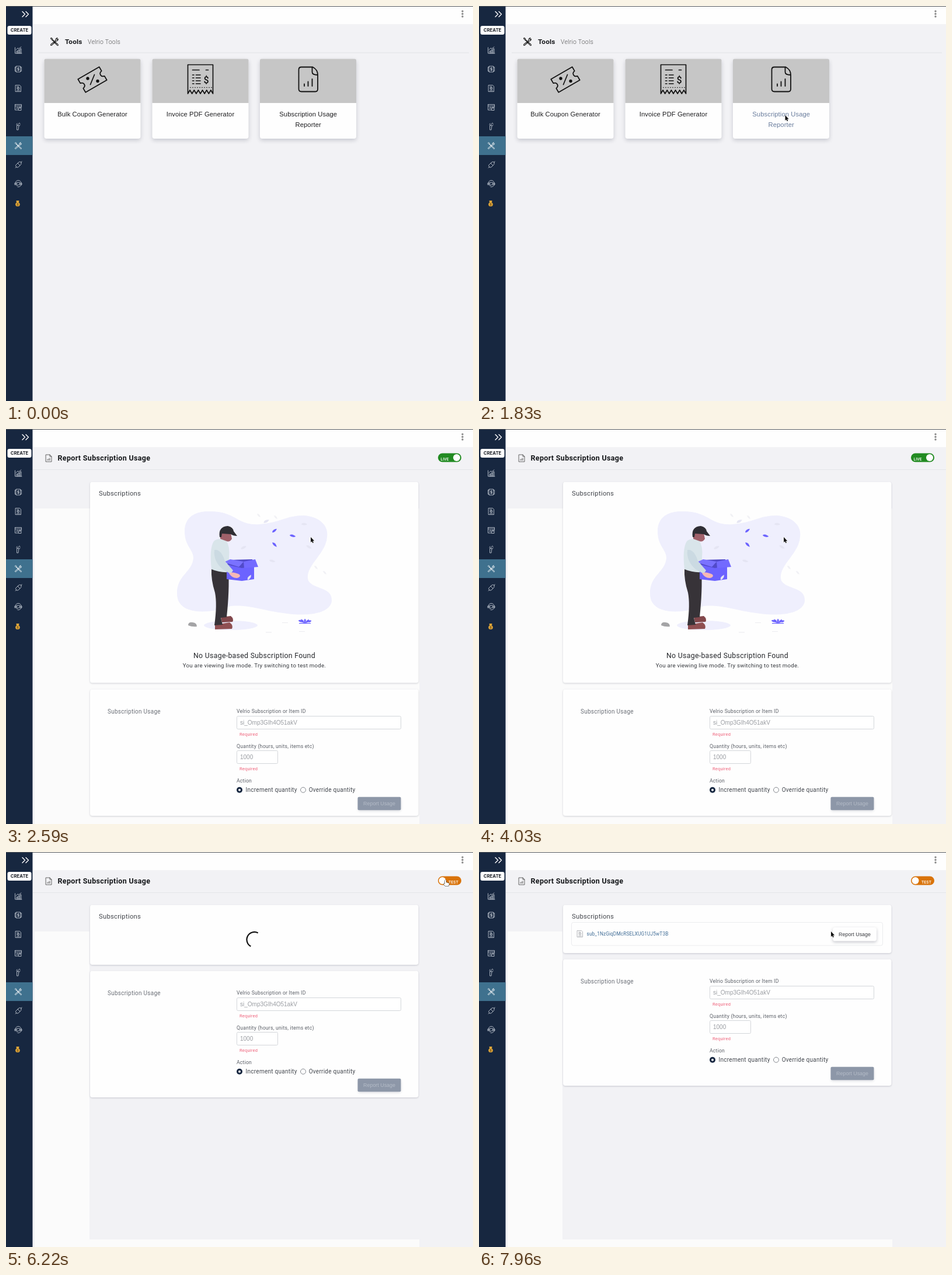
An HTML page with a canvas that plays this animation: 800x676 px, repeating every 8000 ms.

```html
<!DOCTYPE html>
<html lang="en">
<head>
<meta charset="utf-8">
<title>Subscription usage reporter</title>
<style>
html, body { margin: 0; width: 100%; height: 100%; overflow: hidden; background: #f2f2f5; }
canvas { display: block; }
</style>
</head>
<body>
<canvas id="stage" width="800" height="676"></canvas>
<script>
const ctx = document.getElementById('stage').getContext('2d');
const LOOP = 8000;
const OPEN = 1900, EMPTY = 2540, CLICK = 5470, RELOAD = 5540, LOADED = 7330;
const BODY = 'Roboto, sans-serif', UI = '"Liberation Sans", Arial, sans-serif';
const NAVY = '#172740', PAGE = '#f2f2f5', VIOLET = '#6c63ff';

const clamp = v => Math.max(0, Math.min(1, v));
const mix = (a, b, p) => a + (b - a) * p;
const blend = (a, b, p) => `rgb(${a.map((v, i) => Math.round(mix(v, b[i], p)))})`;

function rect(x, y, w, h, color) {
  ctx.fillStyle = color;
  ctx.fillRect(x, y, w, h);
}

function box(x, y, w, h, r, fill, stroke) {
  ctx.beginPath();
  ctx.roundRect(x, y, w, h, r);
  if (fill) { ctx.fillStyle = fill; ctx.fill(); }
  if (stroke) { ctx.strokeStyle = stroke; ctx.lineWidth = 1; ctx.stroke(); }
}

function card(x, y, w, h, blur = 3, dy = 1, alpha = 0.2) {
  ctx.save();
  ctx.shadowColor = `rgba(30,35,60,${alpha})`;
  ctx.shadowBlur = blur;
  ctx.shadowOffsetY = dy;
  box(x, y, w, h, 4, '#fefefe');
  ctx.restore();
}

function text(s, x, y, size, color, { font = BODY, weight = 400, space = 0.25, align = 'left' } = {}) {
  ctx.font = `${weight} ${size}px ${font}`;
  ctx.letterSpacing = space + 'px';
  ctx.textAlign = align;
  ctx.fillStyle = color;
  ctx.fillText(s, x, y);
}

function shape(d, color) {
  ctx.fillStyle = color;
  ctx.fill(new Path2D(d));
}

function icon(d, x, y, color, width = 1, scale = 1) {
  ctx.save();
  ctx.translate(x, y);
  ctx.scale(scale, scale);
  ctx.strokeStyle = color;
  ctx.lineWidth = width;
  ctx.lineJoin = ctx.lineCap = 'round';
  ctx.stroke(new Path2D(d));
  ctx.restore();
}

function disc(x, y, rx, color, ry = rx, turn = 0) {
  ctx.beginPath();
  ctx.ellipse(x, y, rx, ry, turn, 0, 7);
  ctx.fillStyle = color;
  ctx.fill();
}

const TOOLS = 'M-6.5-5.5L-5.5-6.5L-3.5-5L-3-3L5.8 4.5Q7 6 6 6.5Q5 7 4 5.5L-3.5-2.5L-5-3.5Z' +
  'M-6 4.5L2-2Q1.5-5.5 5-6.5L4-4L5-3L6.5-4.5Q6-1 3-1L-4.5 6Q-6 7-6.5 6Z';
const SHEET = 'M-4.5-6H2L5-3V6H-4.5ZM2-6V-3H5M-2 3.5V2M0 3.5V1M2 3.5V0';
const MENU = [
  [76, 'M-5.5-5V5H6M-3 5V1H-1V5M0 5V-1H2V5M3 5V-3H5V5M-4-1L-1-4L1-3L5-6'],
  [108, 'M-3.5-5H3.5V5H-3.5ZM-3.5-3.5H-5.5V3.5H-3.5M3.5-3.5H5.5V3.5H3.5M1-2H-1V0H1V2H-1M0-3V3'],
  [141, 'M-4.5-5.5H2.5L4.5-3.5V5.5H-4.5ZM-2.5-3H1M-2 0A2 2 0 1 0 2 0A2 2 0 1 0-2 0M0-1V1M-2.5 3.7H2.5'],
  [173.5, 'M-5.5-5H5.5V0M-5.5-5V4.5H0M-5.5-2.5H5.5M-3 0H0M-3 2H-1M1 1H5V5H1ZM2 1V-.5H4V1'],
  [206, 'M-2-2L1-1L0 6H-2ZM-1-2L1-5M2-6L3-4M1-1L3-2M-3-3L-2-5'],
  [239, TOOLS],
  [272, 'M-5 5L-3 3M-3 4Q-6 1-3-1L-1-3L3 1L1 3Q-1 5-3 4M0-4Q4-7 5-4Q6-1 3 1M-1-3L0-4M5-4L6-6'],
  [304, 'M-5 1A5.2 5.2 0 1 1 5 1M-5-1H-6V2H-4V-1M5-1H6V2H4V-1M-2.5-2H2.5V2H0L-2 3.5ZM5 2Q4 5 1 5.5H-1']
];

function frame() {
  rect(0, 0, 800, 676, PAGE);
  rect(46, 0, 754, 31, '#fefefe');
}

function chrome() {
  rect(0, 0, 45.5, 676, NAVY);
  rect(0, 223, 45.5, 32, '#3f718e');
  rect(0, 0, 800, 1, '#55585c');
  icon('M-5-4.5L-.5 0L-5 4.5M1-4.5L5.5 0L1 4.5', 33, 14, '#fff', 1.4);
  box(2.5, 34, 41, 15, 3, '#fff');
  text('CREATE', 23, 44.3, 7.8, '#20242b', { font: 'Inter, sans-serif', weight: 700, space: 0, align: 'center' });
  for (const [y, d] of MENU) icon(d, 21, y, y === 239 ? '#fff' : '#cfd5de', y === 239 ? 1 : 0.8, y === 239 ? 0.85 : 1);
  disc(20, 339.5, 3.8, '#dfa63a', 3.6);
  shape('M18 336.5L17.5 333H22.5L22 336.5Z', '#dfa63a');
  text('$', 20, 342, 6, '#6b4a12', { weight: 700, space: 0, align: 'center' });
  for (const y of [9, 13.5, 18]) disc(782, y, 1.7, '#8a8a8a');
}

function ticketIcon() {
  ctx.save();
  ctx.translate(148, 126);
  ctx.rotate(-Math.PI / 6);
  icon('M-21-13H21V-5Q16-4 16 0Q16 4 21 5V13H-21V5Q-16 4-16 0Q-16-4-21-5Z', 0, 0, '#111', 1.8);
  ctx.restore();
  icon('M-3.5 8.5L3.5-8.5', 148, 126, '#111', 1.7);
  disc(140, 124, 2.7, '#111');
  disc(157, 128.5, 2.7, '#111');
}

function receiptIcon() {
  let d = 'M311.5 150V100.5H354.5V150';
  for (let i = 1; i <= 12; i++) d += `L${354.5 - i * 43 / 12} ${i % 2 ? 144 : 150}`;
  icon(d, 0, 0, '#111', 1.7);
  icon('M319.5 109.5H331M342.5 109.5H346.5', 0, 0, '#111', 1.7);
  for (let y = 118; y < 136; y += 5) icon(`M319.5 ${y}H322M325.5 ${y}H333`, 0, 0, '#111', 1.6);
  for (let x = 316; x < 353; x += 4) disc(x, 139.5, 0.8, '#111');
  text('$', 343, 131.5, 16, '#111', { weight: 500, space: 0, align: 'center' });
}

function listPage(t) {
  icon(TOOLS, 83, 61, '#222', 1.1);
  text('Tools', 101, 64.5, 11.8, '#15171a', { weight: 700, space: 0.2 });
  text('Velrio Tools', 140, 64.5, 10.5, '#555', { weight: 300, space: 0.2 });
  rect(56, 79.5, 737, 1, '#e2e3e6');
  for (const x of [65.5, 250.5, 435]) {
    card(x, 90.5, 165, 136.5, 7, 3, 0.2);
    box(x, 90.5, 165, 75.5, [3, 3, 0, 0], '#c6c6c6');
  }
  ticketIcon();
  receiptIcon();
  icon('M506 104.5H525.5Q534 109 534 118V142Q534 146.5 530 146.5H506Q501.5 146.5 501.5 142V109Q501.5 104.5 506 104.5ZM524.5 104.5V113Q524.5 118 534 118M511 133.5V137M517.5 129.5V137M524.5 125V137', 0, 0, '#111', 1.8);
  const style = { font: UI, space: 0.1, align: 'center' };
  const hover = blend([30, 30, 32], [106, 125, 157], clamp((t - 1260) / 150));
  text('Bulk Coupon Generator', 148, 189, 11.2, '#1e1e20', style);
  text('Invoice PDF Generator', 333, 189, 11.2, '#1e1e20', style);
  text('Subscription Usage', 517.7, 189, 11.2, hover, style);
  text('Reporter', 517.7, 206.5, 11.2, hover, style);
}

function toggle(t) {
  const p = clamp((t - CLICK) / 200);
  box(740, 41.5, 40, 15, 7.5, blend([34, 139, 34], [217, 115, 10], p));
  if (p < 0.5) text('LIVE', 744.5, 54, 6.6, '#fff', { weight: 500, space: 0.2 });
  else text('TEST', 758, 54, 6.8, '#fff', { weight: 500, space: 0.2 });
  disc(mix(772, 747.5, p), 49, 6, '#fff');
}

function spinner(t) {
  const start = t < EMPTY ? -25 + (t - 2240) * 0.36 : 118 + (t - 6220) * 0.36;
  ctx.beginPath();
  ctx.arc(425.5, 150, 13, start * Math.PI / 180, (start + 180) * Math.PI / 180);
  ctx.strokeStyle = '#111';
  ctx.lineWidth = 2.2;
  ctx.lineCap = 'butt';
  ctx.stroke();
}

function leaf(x, y, turn, color, size = 1) {
  ctx.save();
  ctx.translate(x, y);
  ctx.rotate(turn);
  ctx.scale(size, size);
  shape('M-6 0Q-2-5 6 0Q0 4-6 0Z', color);
  ctx.restore();
}

function worker() {
  shape('M306 175C306 150 325 140 350 141C395 141 395 166 435 163C470 160 480 148 510 148C540 150 553 168 550 185C548 215 510 235 518 260C528 275 560 270 558 295C555 312 530 320 490 317C440 312 420 300 385 303C345 318 293 318 293 282C292 250 320 245 321 220C320 205 306 200 306 175Z', '#efeffd');
  disc(385, 336, 46, '#efeffd', 8);
  shape('M368 322L385 320Q391 325 388 330L370 331Z', '#82474b');
  shape('M358 335L383 331Q390 336 387 342L358 343Z', '#8f4f52');
  shape('M352 239L381 242Q383 275 378 322L368 323L371 335L357 336Q362 300 358 280Q351 258 352 239Z', '#373338');
  shape('M352 240Q348 205 356 192Q364 185 377 191Q384 200 382 220L381 245Q366 246 352 240Z', '#d9e5ea');
  shape('M367 178H385L387 188Q383 194 378 192L367 188Z', '#a0616a');
  shape('M366 185Q363 167 380 166Q389 168 390 175L396 183Q389 183 385 180L370 179L369 185Z', '#2f2e34');
  shape('M384 224L422 223L425 236L404 240L378 232Z', '#514ac9');
  shape('M378 232L404 238L425 235V257L404 260L378 257Z', VIOLET);
  shape('M373 228L384 223L407 227L399 236Z', '#7a72ff');
  shape('M407 227L427 223L432 236L408 238Z', '#736aff');
  shape('M357 207Q355 226 371 240L385 248L389 242L375 226Q368 205 357 207Z', '#cbdae2');
  shape('M382 247Q388 243 400 249Q403 253 396 255Q388 256 382 247Z', '#f6b8b5');
  shape('M312 336Q312 330 320 331Q327 332 327 338Q319 339 312 336Z', '#a4a4a6');
  for (const [x, turn] of [[505, 0.25], [508, 0.8], [512, 1.57], [516, 2.3], [519, 2.9]]) leaf(x, 329, turn, VIOLET, 0.75);
  rect(502, 332, 20, 1.2, VIOLET);
  leaf(460, 174, -0.7, VIOLET, 0.85);
  leaf(491, 183, 0.2, VIOLET, 0.9);
  leaf(460, 198, 0.75, VIOLET, 0.9);
  for (const [x, y, turn] of [[511, 163, 0], [519, 202, 0.5], [456, 226, 0.2], [407, 203, -0.5], [446, 158, -0.5], [417, 254, -1]]) leaf(x, y, turn, '#e5e5f3', 0.9);
  for (const [x, y] of [[433, 148], [462, 151], [531, 237], [546, 246]]) leaf(x, y, 0.8, '#f1f1f5', 0.7);
  for (const [x, y] of [[445, 347.5], [473, 331], [502, 346]]) rect(x, y, 10, 1, '#ececf0');
}

function field(x, y, w, value) {
  box(x + 0.5, y, w, 22, 2, '#fff', '#d3d6da');
  text(value, x + 6, y + 14.8, 10, '#9a9da2', { font: UI, space: 0 });
  text('Required', x + 5, y + 33.8, 7.5, '#ee5f78', { space: 0.2 });
}

function form(dy) {
  const label = '#5c6068';
  ctx.save();
  ctx.translate(0, dy);
  card(144, 203.5, 562.5, 216.5);
  text('Subscription Usage', 174, 244.5, 10, '#6c7078');
  text('Velrio Subscription or Item ID', 395, 244.3, 8.7, label, { space: 0.2 });
  field(395, 249.5, 281, 'si_Omp3GIh4O51akV');
  text('Quantity (hours, units, items etc)', 395, 303.6, 8.7, label, { space: 0.23 });
  field(395, 308.5, 70, '1000');
  text('Action', 395, 362.8, 8.7, label, { space: 0.2 });
  disc(400, 375.7, 5, NAVY);
  disc(400, 375.7, 2, '#fff');
  text('Increment quantity', 410.5, 378.7, 10, '#44484f', { space: 0.27 });
  icon('M-4.5 0A4.5 4.5 0 1 0 4.5 0A4.5 4.5 0 1 0-4.5 0', 509, 375.7, '#85898f');
  text('Override quantity', 518.7, 378.7, 10, '#44484f');
  card(603, 388, 73.5, 22, 4, 2, 0.15);
  box(602.5, 387.7, 74, 22.6, 2, '#8d97a8');
  text('Report Usage', 639.5, 402.3, 8.9, '#b5bcc8', { font: UI, space: 0, align: 'center' });
  ctx.restore();
}

function subscriptionRow() {
  box(158.5, 120.5, 533, 39.5, 3, null, '#ebecee');
  icon(MENU[2][1], 173, 140, '#b4b6ba');
  text('sub_1NzGiqDMcRSELXUG1UJ5wT3B', 184.5, 143.3, 8.3, '#3f6c96', { space: 0.1 });
  card(606, 129, 75, 23.5, 5, 2, 0.25);
  text('Report Usage', 643.5, 144, 8.9, '#3b3d42', { font: UI, space: 0, align: 'center' });
}

// Pale area behind the cards.
function backdrop(t) {
  if (t < EMPTY) return rect(49, 136, 391, 540, '#f8f9f9');
  rect(49, 136, 659, 540, '#fbfbfb');
  if (t >= RELOAD) rect(143, 136, 565, 527, PAGE);
}

function reportPage(t) {
  const empty = t >= EMPTY && t < RELOAD, loaded = t >= LOADED;
  backdrop(t);
  rect(46, 69, 754, 1, '#e4e5e8');
  icon(SHEET, 73, 50, '#555', 0.9);
  text('Report Subscription Usage', 88.5, 54.2, 12.5, '#15171a', { weight: 700, space: 0.33 });
  toggle(t);
  card(144, 90.5, 562.5, empty ? 344 : loaded ? 82.5 : 102.5);
  text('Subscriptions', 159, 114, 11.3, '#43464c');
  if (empty) {
    worker();
    text('No Usage-based Subscription Found', 425.5, 392, 12.3, '#25272b', { space: 0.3, align: 'center' });
    text('You are viewing live mode. Try switching to test mode.', 425.5, 408, 9.7, '#36393e', { space: 0.23, align: 'center' });
  } else if (loaded) subscriptionRow();
  else spinner(t);
  form(empty ? 242 : loaded ? -20 : 0);
}

// Pointer stops: time, x, y.
const STOPS = [
  [500, 516, 126], [1110, 524.5, 187], [1830, 524.5, 187], [2200, 520, 186], [2590, 522, 185],
  [4030, 522, 185], [4200, 540, 193], [4600, 690, 130], [4830, 757, 67], [4890, 757, 65],
  [5110, 762, 46], [5900, 762, 46], [6220, 753, 48], [6600, 750, 49], [7030, 697, 62],
  [7850, 597, 136], [7900, 598, 136], [7960, 603, 136]
];

function pointer(t) {
  if (t < STOPS[0][0]) return;
  const next = STOPS.findIndex(s => s[0] > t);
  const b = next < 0 ? STOPS.at(-1) : STOPS[next];
  const a = next < 0 ? b : STOPS[next - 1];
  const p = a === b ? 0 : (t - a[0]) / (b[0] - a[0]);
  const x = mix(a[1], b[1], p), y = mix(a[2], b[2], p);
  const hand = t > OPEN && x > 738 && y < 57;
  const d = hand
    ? 'M-1 .5Q0-.8 1 .5V4L5 5Q6.3 5.5 6 7L5 10.5H-.5L-3.5 6.5Q-3.5 5-1 6.5Z'
    : 'M0 0V9L2 7.2L3.3 10.3L4.8 9.6L3.5 6.6H6.2Z';
  ctx.save();
  ctx.translate(x, y);
  ctx.lineJoin = 'round';
  ctx.lineWidth = 1;
  ctx.strokeStyle = hand ? '#111' : '#fff';
  ctx.stroke(new Path2D(d));
  shape(d, hand ? '#fff' : '#111');
  ctx.restore();
}

function draw(t) {
  frame();
  if (t < OPEN) listPage(t);
  else reportPage(t);
  chrome();
  pointer(t);
}

const begin = performance.now();
function tick() {
  draw((performance.now() - begin) % LOOP);
  requestAnimationFrame(tick);
}
tick();
</script>
</body>
</html>
```
